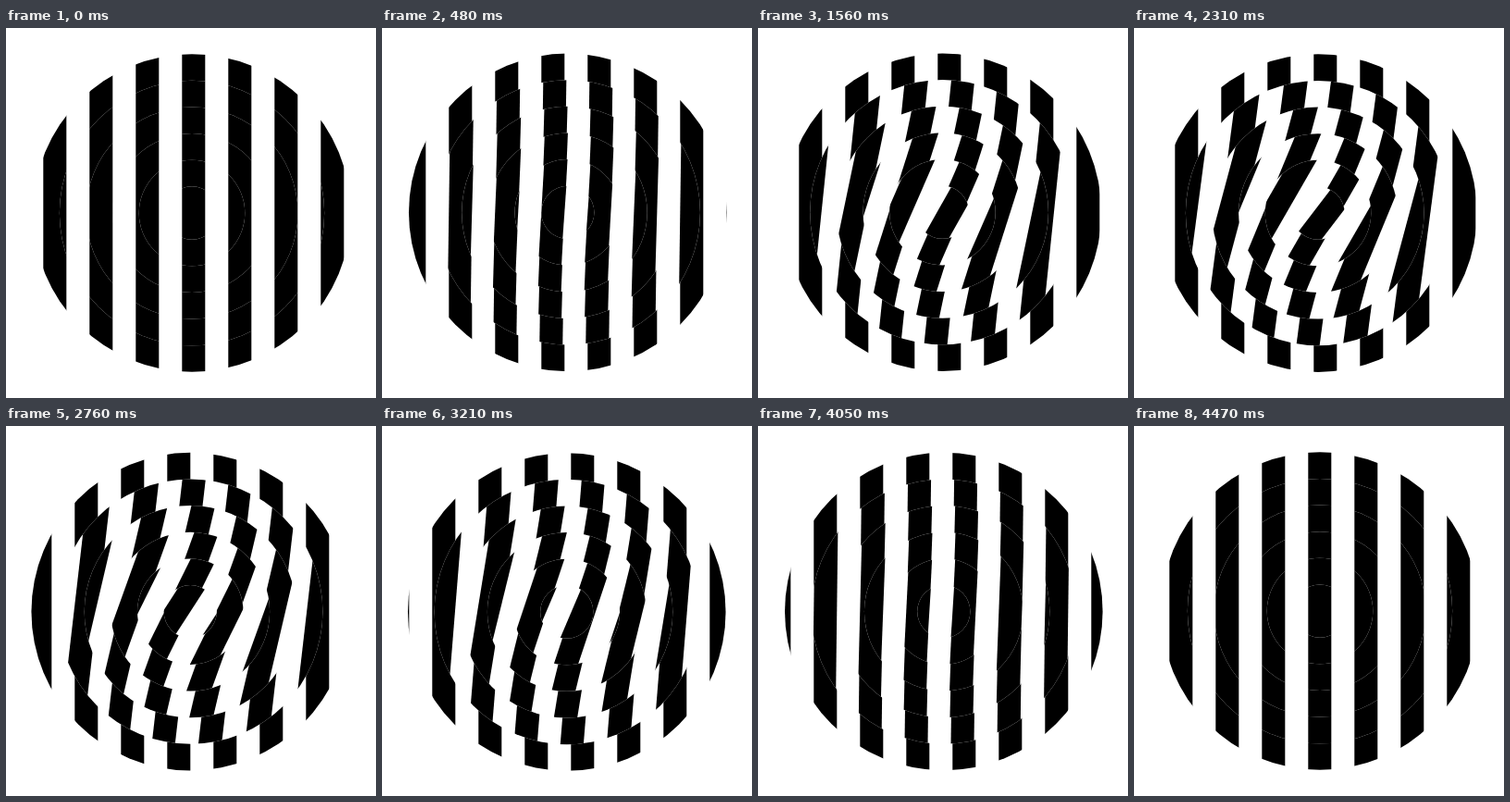
An HTML page with a canvas for the animation above (4500 ms loop, 400 by 400 pixels).

```html
<!DOCTYPE html>
<html lang="en">
<head>
<meta charset="utf-8">
<title>Twisting striped disc</title>
<style>
  html, body { margin: 0; width: 100%; height: 100%; overflow: hidden; background: #fff; }
  canvas { display: block; width: 400px; height: 400px; }
</style>
</head>
<body>
<canvas id="stage" width="400" height="400"></canvas>
<script>
const ctx = document.getElementById('stage').getContext('2d');
const TAU = Math.PI * 2;
const STEP = 30, STEPS = 150;
const RADIUS = 171.8, RINGS = 6;
const PERIOD = 50, STRIPE = 25, SPEED = 2;
const TWIST = Math.PI / 24;

function drawRing(x, y, radius, angle, shift) {
  ctx.save();
  ctx.beginPath();
  ctx.arc(x, y, radius, 0, TAU);
  ctx.clip();
  ctx.fillStyle = '#fff';
  ctx.fillRect(0, 0, 400, 400);
  ctx.translate(x, y);
  ctx.rotate(angle);
  ctx.translate(200 - x, 0);
  ctx.fillStyle = '#000';
  for (let left = shift - 260; left < 250; left += PERIOD) {
    ctx.fillRect(left, -250, STRIPE, 500);
  }
  ctx.restore();
}

function draw(ms) {
  const step = Math.floor(ms / STEP + 1e-6) % STEPS;
  const phase = TAU * step / STEPS;
  const x = 200 + Math.cos(phase);
  const y = 200 - Math.sin(phase);
  const twist = TWIST * (1 - Math.cos(phase)) / 2;
  const shift = (SPEED * step) % PERIOD + 0.3;

  ctx.fillStyle = '#fff';
  ctx.fillRect(0, 0, 400, 400);
  for (let i = 0; i < RINGS; i++) {
    drawRing(x, y, RADIUS * (1 - i / RINGS), i * twist, shift);
  }
}

function tick() {
  draw(performance.now());
  requestAnimationFrame(tick);
}
tick();
</script>
</body>
</html>
```
